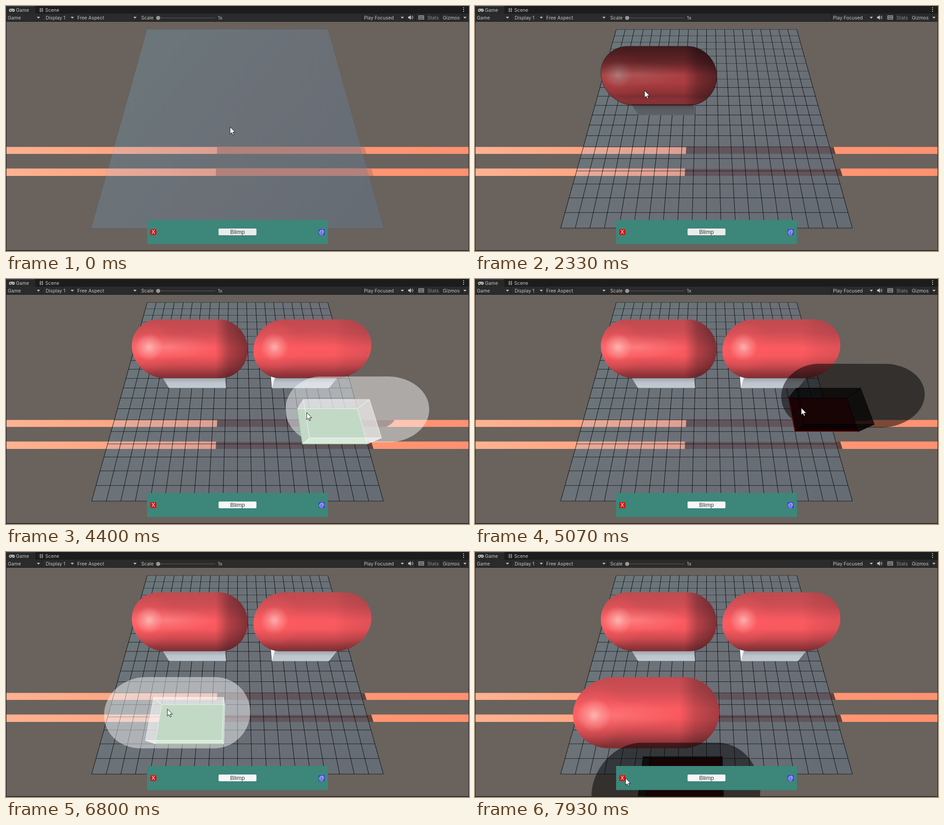
Write an HTML page with a canvas that moves like this. It is 1027 px wide and 545 px high and loops after 8 s.

```html
<!DOCTYPE html>
<html lang="en">
<head>
<meta charset="utf-8">
<title>Grid building</title>
<style>
  html, body { margin: 0; width: 100%; height: 100%; overflow: hidden; background: #191919; }
  canvas, svg { position: absolute; left: 0; top: 0; display: block; }
  .ui { font: 10.5px Inter, sans-serif; fill: #c4c4c4; }
  .panel { font: 13px "Liberation Sans", Arial, sans-serif; text-anchor: middle; }
</style>
</head>
<body>
<canvas id="view" width="1027" height="545"></canvas>
<svg width="1027" height="545" viewBox="0 0 1027 545">
  <g class="ui">
    <rect width="1027" height="17" fill="#1c1c1c"/>
    <rect width="65" height="17" fill="#282828"/>
    <rect width="65" height="1" fill="#24506f"/>
    <rect y="17" width="1027" height="17" fill="#2b2b2b"/>
    <rect y="34" width="1027" height="1" fill="#1b1b1b"/>
    <path d="M10 6h6a3.5 3.5 0 0 1 0 7q-1.500 0-2-1.500h-2q-.5 1.500-2 1.500a3.500 3.500 0 0 1 0-7z" fill="#b4b4b4"/>
    <path d="M8.500 9.500h3M10 8v3M15 9.500h2" stroke="#282828"/>
    <path d="M76.500 4v10M80.500 4v10M73.500 7h9.500M73.500 11h9.500" stroke="#b4b4b4" fill="none"/>
    <text x="22" y="13">Game</text>
    <text x="87" y="13">Scene</text>
    <text x="4" y="30">Game</text>
    <text x="88" y="30">Display 1</text>
    <text x="158" y="30">Free Aspect</text>
    <text x="300" y="30">Scale</text>
    <text x="470" y="30">1x</text>
    <text x="794" y="30">Play Focused</text>
    <text x="935" y="30" fill="#8a8a8a">Stats</text>
    <text x="969" y="30">Gizmos</text>
    <path d="M79.500 17v17M154.500 17v17M294.500 17v17M790.500 17v17M886.500 17v17M908.500 17v17M931.500 17v17M964.500 17v17M1011.500 17v17" stroke="#1b1b1b"/>
    <path d="M68.500 24h7l-3.500 4zM143.500 24h7l-3.500 4zM282.500 24h7l-3.500 4zM875.500 24h7l-3.500 4zM1014.500 24h7l-3.500 4z"/>
    <path d="M338 26.500H464" stroke="#5c5c5c"/>
    <circle cx="337.500" cy="26.500" r="4.500" fill="#999"/>
    <path d="M892 23.500h2.500l3.500-3v10l-3.500-3H892z"/>
    <path d="M899.500 23q2 2.500 0 5M901.500 21.500q3 4 0 8" fill="none" stroke="#c4c4c4"/>
    <rect x="915.500" y="21.500" width="11" height="8" fill="none" stroke="#c4c4c4"/>
    <path d="M916 24.500h10M916 27h10M919 22v5M923 22v5" stroke="#c4c4c4" stroke-width=".8"/>
    <path d="M1014 3h2v2h-2zM1014 7h2v2h-2zM1014 11h2v2h-2z"/>
  </g>
  <g class="panel">
    <rect x="313" y="476" width="401" height="53.500" fill="#3d867a"/>
    <rect id="button" x="471.500" y="495" width="84" height="15" rx="2"/>
    <text x="513.500" y="507" fill="#383838">Blimp</text>
    <rect x="320" y="496.500" width="13.500" height="13" rx="2" fill="#d51212"/>
    <text x="326.700" y="507.300" fill="#fff" font-size="12">X</text>
    <rect x="693.500" y="496.500" width="13.500" height="13" rx="2" fill="#3c3cdc"/>
    <text x="700.200" y="506.500" fill="#fff" font-size="12">@</text>
  </g>
  <path id="cursor" d="M0 0V16L3.700 12.600 6.200 18.200 8.700 17.100 6.200 11.800H11.300Z" fill="#fff" stroke="#111" stroke-linejoin="round"/>
</svg>
<script>
const LOOP = 8000, STEP = 1000 / 15;
const GRID_ON = 800, GHOST_ON = 870, BRIGHT_AT = 2400;
const FOCAL = 440, CX = 513.5, CY = 289;
const SIN = 0.908, COS = 0.4186;          // camera pitch
const NEAR_Y = 6.337, NEAR_Z = 13.6;      // front edge of the board in camera space
const CELLS = 20, WIDE = 5, DEEP = 3, BOX_H = 1.65;
const RADIUS = 2.14, AXIS_H = 3.14;
const BANDS = [[313.5, 329], [361.5, 378]];

const blimps = [
  { at: 2330, i: 4, j: 9, glow: [-0.52, -0.1], streak: 0.42, dark: 0.6, side: '#5f6970' },
  { at: 3600, i: 13, j: 9, glow: [-0.25, -0.1], streak: 0, dark: 0.12, side: '#f4f6f8' },
  { at: 6930, i: 4, j: 2, glow: [-0.6, 0.1], streak: 0.3, dark: 0.42, side: '#5f6970' }
];

// time, x, y of the pointer
const route = [
  [0, 497, 269], [600, 516, 498], [870, 516, 498], [1130, 526, 283],
  [1470, 376, 188], [2340, 376, 188], [2870, 624, 212], [3070, 624, 212],
  [3270, 597, 191], [4130, 597, 191], [4400, 667, 297], [4730, 775, 300],
  [4870, 775, 300], [5200, 695, 279], [5400, 745, 297], [5670, 826, 299],
  [6070, 826, 299], [6800, 358, 349], [7130, 358, 349], [7330, 520, 334],
  [7500, 558, 412], [7730, 408, 470], [7930, 334, 503], [8000, 334, 503]
];

const g = document.getElementById('view').getContext('2d');
const button = document.getElementById('button');
const cursor = document.getElementById('cursor');

function pointer(t) {
  let n = 1;
  while (n < route.length - 1 && route[n][0] < t) n++;
  const [t0, x0, y0] = route[n - 1], [t1, x1, y1] = route[n];
  const u = Math.min(1, Math.max(0, (t - t0) / (t1 - t0)));
  const e = u * u * (3 - 2 * u);
  return [x0 + (x1 - x0) * e, y0 + (y1 - y0) * e];
}

const toCamera = (i, j, h) =>
  [i - CELLS / 2, NEAR_Y - SIN * j - COS * h, NEAR_Z + COS * j - SIN * h];
const flatten = ([x, y, z]) => [CX + FOCAL * x / z, CY + FOCAL * y / z];
const project = (i, j, h = 0) => flatten(toCamera(i, j, h));

function cellUnder(x, y) {
  if (y > 476 && x > 313 && x < 714) return null;
  const v = (y - CY) / FOCAL;
  const j = Math.floor((NEAR_Y - NEAR_Z * v) / (SIN + COS * v));
  const depth = (NEAR_Y - NEAR_Z * v) / (SIN + COS * v) * COS + NEAR_Z;
  const i = Math.floor(CELLS / 2 + (x - CX) * depth / FOCAL);
  return i >= 0 && i < CELLS && j >= 0 && j < CELLS ? { i, j: j - DEEP + 1 } : null;
}

// The ghost stays on the last board cell the pointer touched.
function ghostAt(t) {
  for (let s = t; s >= GHOST_ON; s -= 8) {
    const cell = cellUnder(...pointer(s));
    if (cell) return cell;
  }
  return null;
}

const overlaps = (a, b) => Math.abs(a.i - b.i) < WIDE && Math.abs(a.j - b.j) < DEEP;
const fits = (c, placed) => c.i >= 0 && c.j >= 0 && c.i + WIDE <= CELLS &&
  c.j + DEEP <= CELLS && !placed.some(b => overlaps(b, c));

function hull(points) {
  const sorted = points.slice().sort((a, b) => a[0] - b[0] || a[1] - b[1]);
  const chain = list => {
    const out = [];
    for (const p of list) {
      while (out.length > 1) {
        const [a, b] = out.slice(-2);
        if ((b[0] - a[0]) * (p[1] - a[1]) - (b[1] - a[1]) * (p[0] - a[0]) > 0) break;
        out.pop();
      }
      out.push(p);
    }
    return out.slice(0, -1);
  };
  return chain(sorted).concat(chain(sorted.reverse()));
}

function sphereRing(c) {
  const d = Math.hypot(...c), k = 1 - (RADIUS / d) ** 2, r = RADIUS * Math.sqrt(k);
  const [nx, ny, nz] = c.map(v => v / d), m = Math.hypot(nx, nz);
  const ux = -nz / m, uz = nx / m;
  const v = [ny * uz, nz * ux - nx * uz, -ny * ux];
  return Array.from({ length: 60 }, (_, n) => {
    const a = n * Math.PI / 30, p = r * Math.cos(a), q = r * Math.sin(a);
    return flatten([c[0] * k + p * ux + q * v[0], c[1] * k + q * v[1], c[2] * k + p * uz + q * v[2]]);
  });
}

function capsule({ i, j }) {
  const mid = i + WIDE / 2, row = j + DEEP / 2;
  const ends = [-RADIUS, RADIUS].map(o => toCamera(mid + o, row, AXIS_H));
  return {
    shape: hull(ends.flatMap(sphereRing)),
    a: flatten(ends[0]), b: flatten(ends[1]), r: FOCAL * RADIUS / ends[0][2]
  };
}

function box({ i, j }) {
  const ring = h => [project(i, j, h), project(i + WIDE, j, h),
    project(i + WIDE, j + DEEP, h), project(i, j + DEEP, h)];
  const low = ring(0), top = ring(BOX_H);
  return { low, top, front: [low[0], low[1], top[1], top[0]], all: hull(low.concat(top)) };
}

function trace(points) {
  g.beginPath();
  points.forEach(p => g.lineTo(...p));
  g.closePath();
}
function fill(points, style) { trace(points); g.fillStyle = style; g.fill(); }
function outline(points, style, width = 1.3) {
  trace(points);
  g.strokeStyle = style; g.lineWidth = width; g.stroke();
}
function line(a, b, style, width) {
  g.beginPath(); g.moveTo(...a); g.lineTo(...b);
  g.strokeStyle = style; g.lineWidth = width; g.stroke();
}
function ramp(x0, y0, x1, y1, stops) {
  const grad = g.createLinearGradient(x0, y0, x1, y1);
  stops.forEach(([at, c]) => grad.addColorStop(at, c));
  return grad;
}
function glow(x, y, r, rgb, alpha, stretch = 1) {
  const grad = g.createRadialGradient(0, 0, 0, 0, 0, r);
  grad.addColorStop(0, `rgba(${rgb},${alpha})`);
  grad.addColorStop(0.4, `rgba(${rgb},${alpha * 0.5})`);
  grad.addColorStop(1, `rgba(${rgb},0)`);
  g.save();
  g.translate(x, y); g.scale(stretch, 1);
  g.fillStyle = grad; g.fillRect(-r, -r, 2 * r, 2 * r);
  g.restore();
}

const board = [project(0, 0), project(CELLS, 0), project(CELLS, CELLS), project(0, CELLS)];

// Slanted piece of each band that lies in the board's shadow
function bandShadow(style) {
  for (const [y0, y1] of BANDS) {
    const left = y => 468.5 - (y - 313) * 0.05, right = y => 795 + (y - 313) * 0.31;
    fill([[left(y0), y0], [right(y0), y0], [right(y1), y1], [left(y1), y1]], style);
  }
}
function bands(style) {
  g.fillStyle = style;
  BANDS.forEach(([y0, y1]) => g.fillRect(0, y0, 1027, y1 - y0));
}

function drawGround(gridOn, ghost) {
  g.fillStyle = '#69625d';
  g.fillRect(0, 0, 1027, 545);
  bands(ramp(0, 0, 1027, 0, [[0, '#ffb291'], [0.25, '#ffa582'], [0.75, '#ff9673'], [1, '#ff9170']]));
  bandShadow(gridOn ? '#5f443d' : '#d8836a');
  if (ghost) {
    g.save();
    g.beginPath();
    BANDS.forEach(([y0, y1]) => g.rect(785, y0, 242, y1 - y0));
    g.clip();
    const x = 831 + 16.5 * (ghost.i - 15), y = 295 - 15.4 * (ghost.j - 4);
    g.beginPath();
    g.arc(x, y, 36, -Math.PI / 2, Math.PI / 2);
    g.lineTo(x - 70, y + 36); g.lineTo(x - 70, y - 36);
    g.fillStyle = '#5f443d'; g.fill();
    g.restore();
  }
  fill(board, ramp(250, 80, 780, 480, [[0, '#6b777b'], [0.5, '#6b7077'], [1, '#666c74']]));
  g.save();
  trace(board); g.clip();
  bands(ramp(225, 0, 470, 0, [[0, '#eaaa99'], [1, '#dd9f91']]));
  bandShadow(gridOn ? '#61555c' : '#b3817b');
  g.restore();
  if (!gridOn) return;
  for (let n = 0; n <= CELLS; n++) {
    line(project(n, 0), project(n, CELLS), 'rgba(0,0,0,.88)', 1);
    line(project(0, n), project(CELLS, n), `rgba(0,0,0,${n > 12 ? 0.5 : 0.8})`, 0.9);
  }
}

function drawBlimp(blimp) {
  const { shape, a, b, r } = capsule(blimp), cube = box(blimp);
  fill(cube.all, blimp.side);
  fill(cube.front, ramp(0, cube.top[0][1], 0, cube.low[0][1], [[0, '#98a0a8'], [0.5, '#bcc4cc'], [1, '#c2cbd3']]));
  g.save();
  trace(shape); g.clip();
  g.fillStyle = ramp(0, a[1] - r, 0, a[1] + r, [[0, '#c24b50'], [0.2, '#cf4e54'], [0.46, '#fb5b60'],
    [0.6, '#f8595e'], [0.78, '#cc4a4f'], [0.92, '#98383d'], [1, '#7f2f34']]);
  g.fillRect(0, 0, 1027, 545);
  const x = a[0] + blimp.glow[0] * r, y = a[1] + blimp.glow[1] * r;
  glow(x, y, r * 0.95, '255,92,97', 0.7);
  if (blimp.streak) glow(x + r * 0.6, y, r * 0.45, '255,170,168', blimp.streak, 4);
  glow(x, y, r * 0.5, '255,205,200', 0.75);
  g.fillStyle = ramp(b[0] - r * 0.15, 0, b[0] + r, 0,
    [[0, 'rgba(45,20,26,0)'], [0.4, `rgba(45,20,26,${blimp.dark * 0.6})`], [1, `rgba(45,20,26,${blimp.dark})`]]);
  g.fillRect(0, 0, 1027, 545);
  g.restore();
}

function drawGhost(cell, placed) {
  const ok = fits(cell, placed), { shape, a, r } = capsule(cell), cube = box(cell);
  if (placed.some(b => b.i === cell.i && b.j === cell.j)) {
    fill(cube.front, 'rgba(0,0,0,.52)');
    fill(shape, ramp(0, a[1] - r, 0, a[1] + r, [[0, 'rgba(0,0,0,.64)'], [0.25, 'rgba(0,0,0,.52)'],
      [0.47, 'rgba(0,0,0,.32)'], [0.85, 'rgba(0,0,0,.3)'], [0.92, 'rgba(0,0,0,.1)'], [1, 'rgba(0,0,0,0)']]));
    outline(shape, 'rgba(25,25,25,.8)', 1);
    return;
  }
  const tint = ok ? '255,255,255' : '0,0,0';
  fill(shape, `rgba(${tint},${ok ? 0.45 : 0.51})`);
  fill(cube.all, `rgba(${tint},${ok ? 0.52 : 0.7})`);
  fill(cube.low, ok ? '#c2d9c6' : '#180305');
  fill(cube.front, `rgba(${tint},${ok ? 0.42 : 0.55})`);
  const edge = `rgba(${tint},${ok ? 0.6 : 0.75})`;
  outline(cube.low, edge);
  outline(cube.top, edge);
  cube.low.forEach((p, n) => line(p, cube.top[n], edge, 1.3));
  const rim = ok ? 'rgba(90,215,95,.75)' : '#c80c14';
  line(cube.low[0], cube.low[1], rim, 1.2);
  if (cell.i >= CELLS / 2) line(cube.low[0], cube.low[3], rim, 0.8);
}

function draw(now) {
  const t = Math.floor((now % LOOP + 4) / STEP) * STEP;
  const placed = blimps.filter(b => t >= b.at);
  const ghost = ghostAt(t);
  g.save();
  g.clearRect(0, 0, 1027, 545);
  g.beginPath(); g.rect(1, 35, 1025, 508.5); g.clip();
  drawGround(t >= GRID_ON, ghost);
  placed.forEach(drawBlimp);
  if (ghost) drawGhost(ghost, placed);
  g.restore();
  button.setAttribute('fill', t < BRIGHT_AT ? '#ebebeb' : '#f6f6f6');
  const [x, y] = pointer(t);
  cursor.setAttribute('transform', `translate(${x} ${y})`);
}

const start = performance.now();
function tick() {
  draw(performance.now() - start);
  requestAnimationFrame(tick);
}
tick();
</script>
</body>
</html>
```
